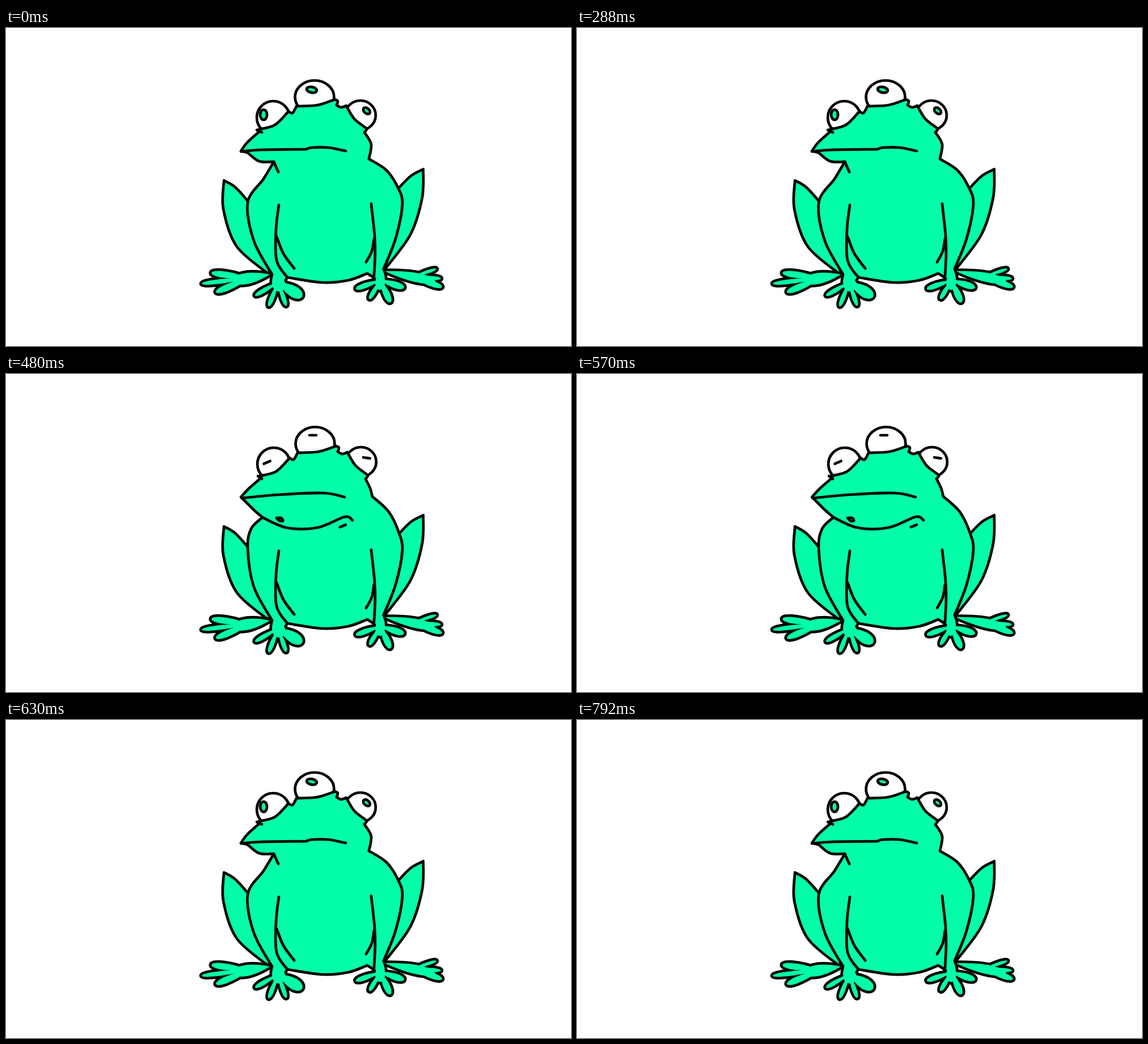
An HTML page for the animation above (0.9 s loop, 998 by 561 pixels).

```html
<!DOCTYPE html>
<html lang="en">
<head>
<meta charset="utf-8">
<title>Blinking frog</title>
<style>
  html, body { margin: 0; width: 100%; height: 100%; overflow: hidden; background: #fff; }
  svg { display: block; width: 100%; height: 100%; }
  path, ellipse { stroke: #000; stroke-width: 4.7; stroke-linecap: round; stroke-linejoin: round; }
  .skin { fill: #04fda8; }
  .eye { fill: #fff; }
  .line { fill: none; }
  .rim { stroke-width: 9.4; }
  .flesh { fill: #04fda8; stroke: none; }
</style>
</head>
<body>
<svg id="stage" viewBox="0 0 998 561"></svg>
<script>
const LOOP = 900, BLINK_START = 480, BLINK_END = 630;
const stage = document.getElementById('stage');

function add(parent, tag, attrs) {
  const node = document.createElementNS('http://www.w3.org/2000/svg', tag);
  for (const key in attrs) node.setAttribute(key, attrs[key]);
  parent.append(node);
  return node;
}

// Points are "x y" pairs split by commas; a semicolon turns the point before it into a corner.
function smooth(text) {
  let corner = null, d = '';
  for (const part of text.split(';')) {
    const pts = part.split(',').map(p => p.trim().split(' ').map(Number));
    if (corner) pts.unshift(corner);
    else d = 'M' + pts[0];
    for (let i = 0; i < pts.length - 1; i++) {
      const a = pts[i], b = pts[i + 1];
      const before = pts[i - 1] || a, after = pts[i + 2] || b;
      const c1 = a.map((v, k) => v + (b[k] - before[k]) / 6);
      const c2 = b.map((v, k) => v - (after[k] - a[k]) / 6);
      d += `C${c1} ${c2} ${b}`;
    }
    corner = pts[pts.length - 1];
  }
  return d;
}

const shift = (text, dx, dy) =>
  text.replace(/(\d+) (\d+)/g, (_, x, y) => `${+x + dx} ${+y + dy}`);

// A single cubic loop that starts and ends at one point and swells towards its tip.
function teardrop([x, y], [tipX, tipY], width) {
  const dx = tipX - x, dy = tipY - y, length = Math.hypot(dx, dy);
  const nx = -dy / length * width, ny = dx / length * width;
  const farX = x + dx * 4 / 3, farY = y + dy * 4 / 3;
  return `M${x} ${y}C${farX + nx} ${farY + ny} ${farX - nx} ${farY - ny} ${x} ${y}Z`;
}

// A sole with toes fanning out from its broad part.
function footPath({ ankle, ball, width, toes }) {
  const base = ankle.map((v, k) => v + 0.55 * (ball[k] - v));
  return teardrop(ankle, ball, width) +
    toes.map(([x, y, w]) => teardrop(base, [x, y], w)).join('');
}

const hands = [
  { ankle: [474, 430], ball: [486, 464], width: 40,
    toes: [[440, 472, 14], [464, 491, 14], [495, 490, 14], [523, 474, 34]] },
  { ankle: [663, 424], ball: [660, 462], width: 30,
    toes: [[618, 460, 16], [642, 478, 14], [679, 484, 20], [703, 458, 20]] }
];
const feet = [
  { ankle: [466, 435], ball: [402, 446], width: 34,
    toes: [[363, 432, 20], [346, 451, 14], [371, 466, 20]] },
  { ankle: [669, 429], ball: [758, 447], width: 28,
    toes: [[760, 425, 10], [768, 442, 12], [770, 457, 18]] }
];
const thighs = [
  '428 306, 405 281, 385 269; 384 320, 408 386, 468 437',
  '692 284, 715 261, 737 249; 735 300, 714 365, 668 427'
];
const eyes = [
  { x: 472, y: 158, rx: 29, ry: 29, pupil: [455, 153, 6, 9, 0], lid: [461, 156, -24] },
  { x: 545, y: 122, rx: 34.5, ry: 29.5, pupil: [540, 109, 9, 5, 12], lid: [542, 108, 0] },
  { x: 626, y: 154, rx: 27, ry: 26, pupil: [637, 146, 7, 4.5, 42], lid: [637, 148, 8] }
];
const crown = '446 179; 475 171, 499 147; 506 150, 513 138; 550 136, 581 126; ' +
  '586 129, 584 136; 592 140, 601 137; 615 160, 634 175; 637 179, 633 184';
const trunk = '700 312, 688 372, 667 425; 671 440, 663 456; 650 441, 638 433; ' +
  '605 445, 560 449, 497 440; 484 456, 472 438; 438 376, 427 308';
const creases = [
  '482 312, 477 355, 478 410, 497 440',
  '478 368, 490 398, 509 424',
  '645 310, 651 365, 652 400, 650 438',
  '650 372, 646 394, 636 413'
];

const poses = {
  awake: {
    nudge: [0, 0],
    brow: '415 217, 426 202, 446 184',
    shoulder: '645 205, 641 231; 672 251, 693 283',
    chin: '455 266, 473 236; 447 235, 427 220; 415 217',
    lines: ['415 218, 450 215, 530 214; 540 211, 570 211, 600 217', '443 180, 452 184', '473 236, 481 254']
  },
  blink: {
    nudge: [2, 1],
    brow: '415 217, 430 201, 451 183',
    shoulder: '643 201, 647 216; 676 243, 694 280',
    chin: '433 273, 453 253; 437 239, 422 224; 415 217',
    lines: ['416 219, 480 213, 560 210, 598 217', '445 180, 452 185',
      '453 253, 495 271, 550 271, 598 252, 612 258',
      '478 254, 486 254, 489 259, 483 259, 478 254', '590 270, 600 266']
  }
};

function drawEye(group, { x, y, rx, ry, pupil, lid }, shut) {
  const offset = shut ? 1 : 0;
  add(group, 'ellipse', { class: 'eye', cx: x + offset, cy: y + offset, rx, ry });
  if (shut) {
    const [cx, cy, angle] = lid;
    add(group, 'path', { d: `M${cx - 6} ${cy}h12`, transform: `rotate(${angle} ${cx} ${cy})` });
  } else {
    const [cx, cy, prx, pry, angle] = pupil;
    add(group, 'ellipse', { class: 'skin', cx, cy, rx: prx, ry: pry, transform: `rotate(${angle} ${cx} ${cy})` });
  }
}

function drawFrog({ nudge, brow, shoulder, chin, lines }, shut) {
  const group = add(stage, 'g', {});
  const path = (kind, d) => add(group, 'path', { class: kind, d });
  thighs.forEach(points => path('skin', smooth(points) + 'Z'));
  [...feet, ...hands].forEach(foot => path('rim', footPath(foot)));
  feet.forEach(foot => path('flesh', footPath(foot)));
  eyes.forEach(eye => drawEye(group, eye, shut));
  const head = [brow, shift(crown, ...nudge), shoulder].join(';');
  path('skin', smooth([head, trunk, chin].join(',')) + 'Z');
  hands.forEach(hand => path('flesh', footPath(hand)));
  [...lines, ...creases].forEach(points => path('line', smooth(points)));
  return group;
}

const awake = drawFrog(poses.awake, false);
const blink = drawFrog(poses.blink, true);

function render(now) {
  const t = now % LOOP;
  const shut = t >= BLINK_START && t < BLINK_END;
  awake.style.display = shut ? 'none' : '';
  blink.style.display = shut ? '' : 'none';
}

function tick(now) {
  render(now);
  requestAnimationFrame(tick);
}

render(0);
requestAnimationFrame(tick);
</script>
</body>
</html>
```
